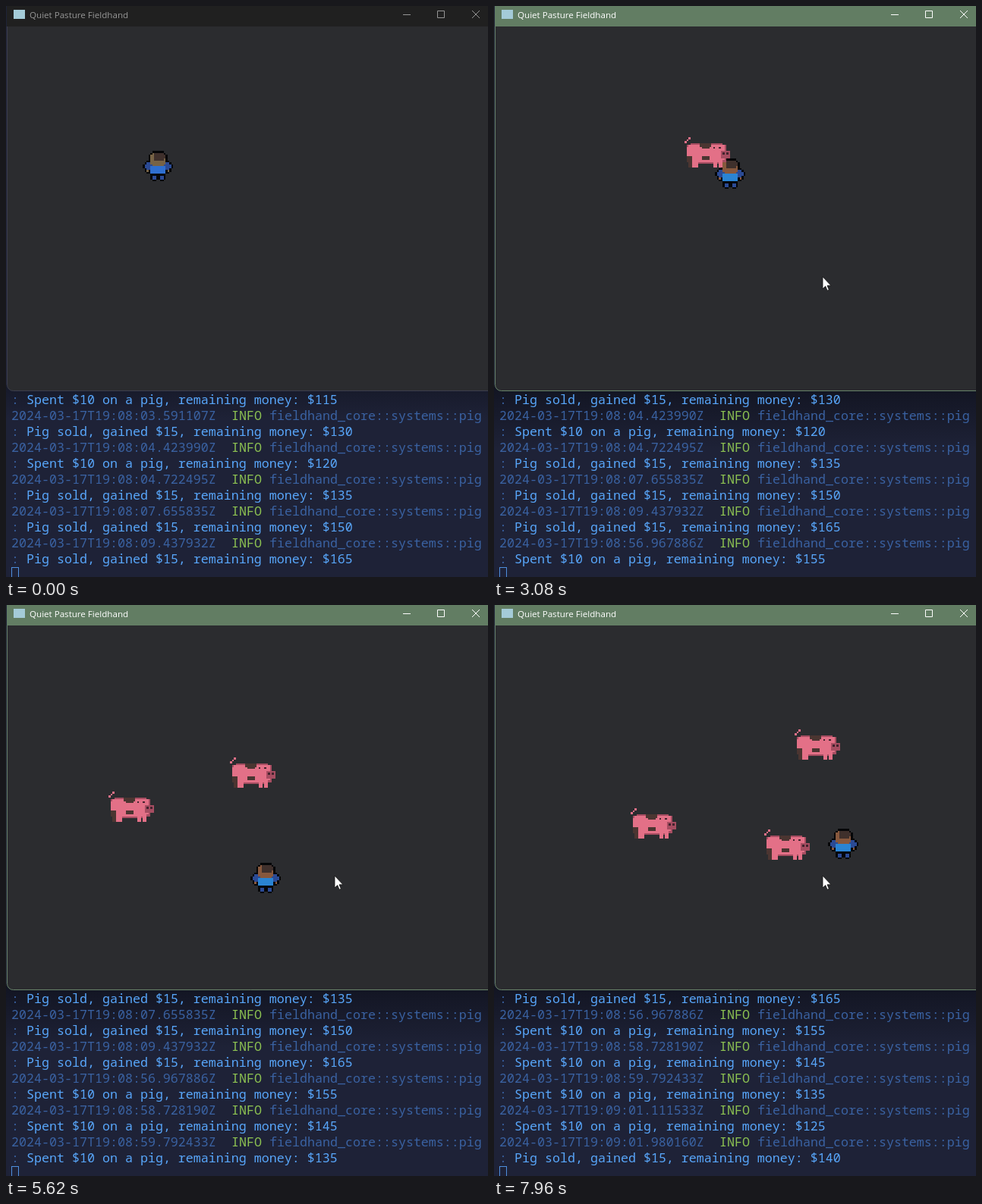
Animation, 635 px wide and 753 px high, one loop 8000 ms. Source, as an HTML page with a canvas:

```html
<!DOCTYPE html>
<html lang="en">
<head>
<meta charset="utf-8">
<title>Pig farm</title>
<style>
  html, body { margin: 0; width: 100%; height: 100%; overflow: hidden; background: #1e2237; }
  canvas { display: block; }
</style>
</head>
<body>
<canvas id="stage" width="635" height="753"></canvas>
<script>
const ctx = document.getElementById('stage').getContext('2d');
const LOOP = 8000, STEP = 68.9, UNIT = 2.5;
const RESTARTS = [0, 1100, 1450, 2120, 2940, 4520, 4720]; // the picture advances in STEPs from these times

// A walk follows its corners from start to end; both axes share one top speed.
const walk = (start, end, ...corners) => ({ start, end, corners });
const playerWalks = [
  walk(2051, 2740, [200, 211], [203, 243], [233, 243], [281, 193]),
  walk(2900, 4318, [281, 193], [330, 238], [267, 324], [222, 324], [161, 271]),
  walk(4651, 5616, [161, 271], [250, 271], [342, 360]),
  walk(5690, 6905, [342, 360], [418, 285], [418, 230], [398, 207], [426, 184]),
  walk(6905, 7958, [426, 184], [486, 245], [486, 290], [460, 315])
];
const pigWalks = [
  [walk(3700, 4318, [281, 193], [347, 198]), walk(4651, 7770, [347, 198], [277, 271])],
  [walk(5490, 6718, [161, 271], [203, 225]), walk(6718, 7950, [203, 225], [210, 288])],
  [walk(6550, 7950, [342, 360], [386, 316])],
  [walk(0, LOOP, [426, 184], [426, 184])]
];

// Trades by seconds on the log clock after 19:08; the live ones follow from FIRST_BUY.
const FIRST_BUY = 56.967886, FIRST_BUY_AT = 2735, PIG_LIFE = 5012, SPAWN_DELAY = 60;
const trades = [
  'buy 2.870416', 'sell 3.591107', 'buy 4.423990', 'sell 4.722495', 'sell 7.655835', 'sell 9.437932',
  'buy 56.967886', 'buy 58.728190', 'buy 59.792433', 'buy 61.111533', 'sell 61.980160'
];
let money = 125;
const entries = trades.map(trade => {
  const [kind, seconds] = trade.split(' ');
  const buy = kind === 'buy';
  money += buy ? -10 : 15;
  const minute = String(8 + Math.floor(seconds / 60)).padStart(2, '0');
  const second = (seconds % 60).toFixed(6).padStart(9, '0');
  return {
    buy,
    at: FIRST_BUY_AT + (seconds - FIRST_BUY) * 1000,
    stamp: `2024-03-17T19:${minute}:${second}Z`,
    text: `${buy ? 'Spent $10 on a pig' : 'Pig sold, gained $15'}, remaining money: $${money}`
  };
});
const pigs = entries.filter(e => e.buy && e.at > 0).map((e, i) => ({
  from: e.at + SPAWN_DELAY, to: e.at + PIG_LIFE, walks: pigWalks[i]
}));

// Rasterises rounded blobs [colour, cx, cy, rx, ry] on a coarse grid, with an optional outline.
function pixelate(cols, power, blobs, outline) {
  const colorAt = (x, y) => blobs.findLast(([, cx, cy, rx, ry]) =>
    Math.abs((x + 0.5 - cx) / rx) ** power + Math.abs((y + 0.5 - cy) / ry) ** power <= 1)?.[0];
  const cells = [];
  for (let y = 0; y < 16; y++)
    for (let x = 0; x < cols; x++) {
      const edge = colorAt(x - 1, y) || colorAt(x + 1, y) || colorAt(x, y - 1) || colorAt(x, y + 1);
      const color = colorAt(x, y) || (edge && outline);
      if (color) cells.push({ x, y, color });
    }
  return { cols, cells };
}

const mirrored = (color, x, ...rest) => [[color, x, ...rest], [color, 16 - x, ...rest]];
const playerSprite = (skin, shirt) => pixelate(16, 3, [
  ...mirrored('#2b4a94', 3, 8, 1.85, 1.85),
  ...mirrored(skin, 2.5, 10.5, 0.6, 0.6),
  ...mirrored('#2b4a94', 6, 14, 1.1, 1.1),
  [shirt, 8, 10, 4.2, 2.2],
  [skin, 8, 4.7, 4.2, 3.6],
  ['#3f302c', 8.8, 2.9, 3, 2]
], '#050608');
const idlePlayer = playerSprite('#776346', '#2f6fd0');
const walkingPlayer = playerSprite('#87583d', '#2a84d3');

const PINK = '#e37087', ROSE = '#a64d61', MUD = '#4b3531', DARK = '#44232e';
const pigSprite = pixelate(24, 6, [
  ...[0, 1, 2].map(i => [PINK, 2.5 - i, 0.5 + i, 0.6, 0.6]),
  [ROSE, 11.5, 8.5, 10.7, 5.3],
  [PINK, 11.2, 8.3, 10.3, 4.6],
  [MUD, 11, 4, 3.2, 1.1],
  [MUD, 11, 5.5, 2, 0.6],
  [MUD, 11, 11, 1.7, 1.1],
  [MUD, 2.5, 11.5, 1.7, 1.6],
  [MUD, 3, 14.5, 1.1, 1.6],
  ...[5.5, 16, 19].map(x => [PINK, x, 14.5, 1.1, 1.6]),
  [ROSE, 21.5, 9, 2.6, 2.1],
  ...[15.5, 18.5].map(x => [DARK, x, 5.5, 0.6, 0.6]),
  ...[20.5, 22.5].map(x => [DARK, x, 8.5, 0.6, 0.6])
]);

function position(walks, t) {
  const { start, end, corners } = walks.findLast(w => w.start <= t) || walks[0];
  const lengths = corners.slice(1).map(([x, y], i) =>
    Math.max(Math.abs(x - corners[i][0]), Math.abs(y - corners[i][1])));
  const total = lengths.reduce((a, b) => a + b);
  let left = total * Math.min(1, Math.max(0, (t - start) / (end - start)));
  for (let i = 0; i < lengths.length; i++) {
    if (left < lengths[i]) {
      const k = left / lengths[i];
      return corners[i].map((v, axis) => v + (corners[i + 1][axis] - v) * k);
    }
    left -= lengths[i];
  }
  return corners.at(-1);
}

function rect(color, x, y, w, h) {
  ctx.fillStyle = color;
  ctx.fillRect(x, y, w, h);
}

function text(string, x, y, color) {
  ctx.fillStyle = color;
  ctx.fillText(string, x, y);
}

function drawSprite({ cols, cells }, [cx, cy]) {
  const left = Math.round(cx - cols * UNIT / 2), top = Math.round(cy - 8 * UNIT);
  const snap = v => Math.round(v * UNIT);
  for (const { x, y, color } of cells)
    rect(color, left + snap(x), top + snap(y), snap(x + 1) - snap(x), snap(y + 1) - snap(y));
}

function drawConsole(t, focus) {
  rect('#1e2237', 0, 0, 635, 753);
  const shade = ctx.createLinearGradient(0, 500, 0, 545 + 40 * focus);
  shade.addColorStop(0, `rgba(8,9,16,${0.35 + 0.2 * focus})`);
  shade.addColorStop(1, 'rgba(8,9,16,0)');
  rect(shade, 0, 500, 635, 90);

  ctx.font = '500 16.667px "Noto Sans Mono", monospace';
  const dim = '#3a62a2';
  entries.filter(e => e.at <= t).slice(-6).forEach((entry, i) => {
    const y = 525 + i * 42;
    if (i) {
      text(entry.stamp, 7, y - 21, dim);
      text('INFO', 297, y - 21, '#8cc152');
      text('fieldhand_core::systems::pig', 347, y - 21, dim);
    }
    text(':', 7, y, dim);
    text(entry.text, 27, y, '#58a6fa');
  });
  ctx.strokeStyle = '#4f8fdd';
  ctx.lineWidth = 1;
  ctx.strokeRect(7.5, 740.5, 9, 15);
}

function drawWindow(focus) {
  const mix = (a, b) => `rgb(${a.map((v, i) => Math.round(v + (b[i] - v) * focus))})`;
  const ink = mix([150, 150, 150], [255, 255, 255]);
  ctx.beginPath();
  ctx.roundRect(1.5, -20, 660, 527.5, 8);
  ctx.fillStyle = '#2b2c2f';
  ctx.fill();
  ctx.strokeStyle = mix([60, 62, 78], [104, 132, 106]);
  ctx.stroke();
  rect(mix([32, 32, 32], [98, 125, 99]), 1, 0, 634, 27);
  rect('#a4cbd8', 10, 5, 15, 12);
  ctx.font = '11.6px "Open Sans", sans-serif';
  text('Quiet Pasture Fieldhand', 31, 16, ink);

  ctx.strokeStyle = ink;
  ctx.stroke(new Path2D('M523 11.5H533M568.5 6.5H577.5V15.5H568.5ZM614 6L624 16M624 6L614 16'));
}

function drawPointer(t) {
  if (t < 1100) return;
  const left = (1 - Math.min(1, (t - 1100) / 206)) ** 1.6;
  const arrow = new Path2D('M0 0V16L3.7 12.6L6.1 18.3L8.4 17.3L6 11.8H11Z');
  ctx.save();
  ctx.translate(433 + 189 * left, 357 + 378 * left);
  ctx.fillStyle = '#fff';
  ctx.fill(arrow);
  ctx.strokeStyle = '#111';
  ctx.lineWidth = 0.8;
  ctx.stroke(arrow);
  ctx.restore();
}

function frame() {
  const now = performance.now() % LOOP;
  const restart = RESTARTS.findLast(r => r <= now);
  const t = restart + Math.floor((now - restart) / STEP + 0.02) * STEP;
  const focus = now < 1450 ? 0 : now < 1510 ? 0.5 : 1;
  drawConsole(t, focus);
  drawWindow(focus);
  drawSprite(t < 2120 ? idlePlayer : walkingPlayer, position(playerWalks, t));
  for (const { from, to, walks } of pigs)
    if (t >= from && t < to) drawSprite(pigSprite, position(walks, t));
  drawPointer(t);
  requestAnimationFrame(frame);
}
frame();
</script>
</body>
</html>
```
